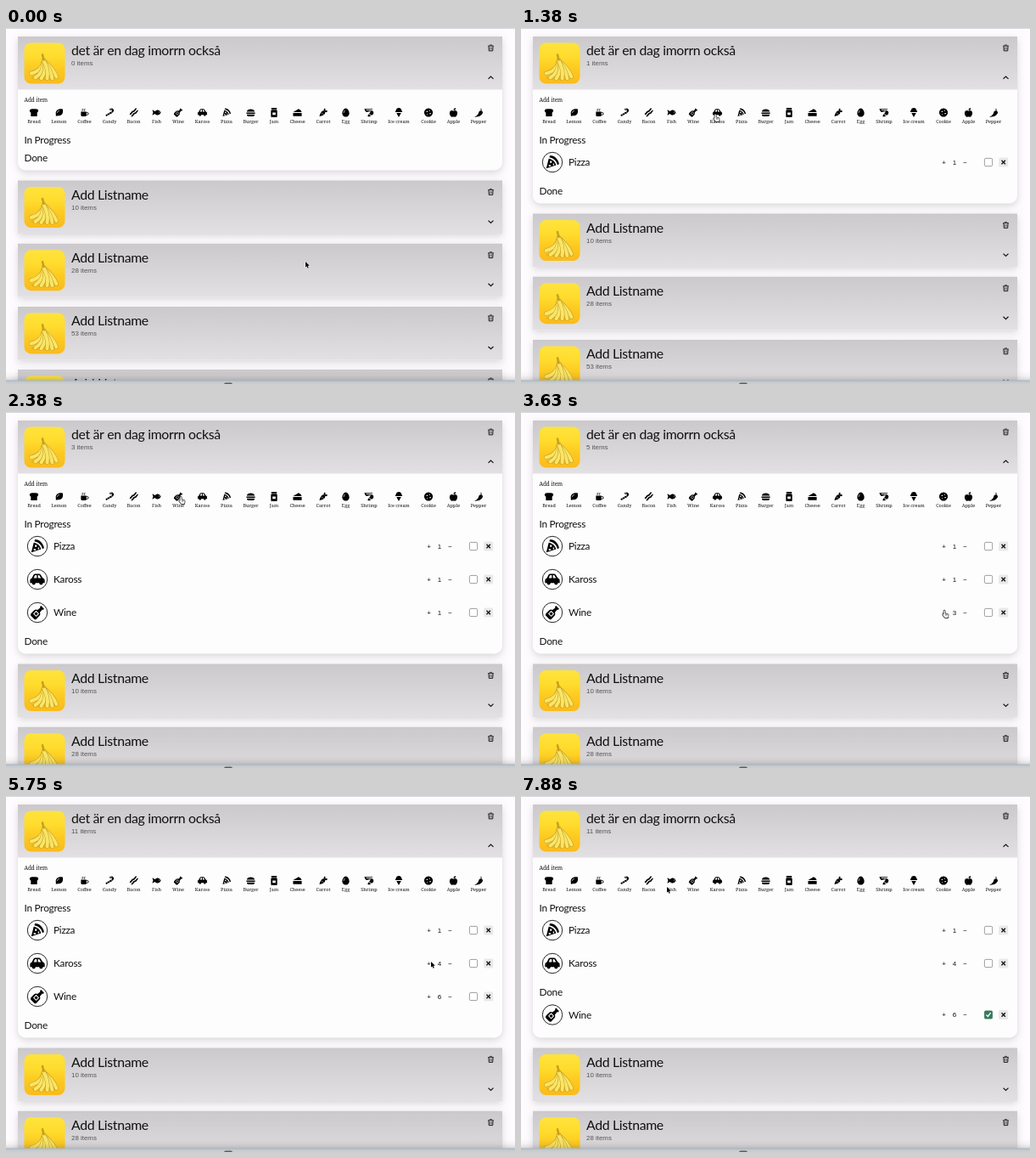
Recreate the animation shown at these times as an HTML page with a canvas. Size 600x419 px, loop 8000 ms.

```html
<!DOCTYPE html>
<html lang="sv">
<head>
<meta charset="utf-8">
<title>Shopping lists</title>
<style>
html, body { margin: 0; width: 100%; height: 100%; overflow: hidden; background: #fefcfe; }
canvas { display: block; width: 600px; height: 419px; }
</style>
</head>
<body>
<canvas id="stage"></canvas>
<script>
const W = 600, H = 419, LOOP = 8000, STEP = 125, ROW = 39;
const stage = document.getElementById('stage');
const dpr = window.devicePixelRatio || 1;
stage.width = Math.round(W * dpr);
stage.height = Math.round(H * dpr);
const c = stage.getContext('2d');

const DISPLAY = 'Lato, sans-serif';
const SANS = '"Liberation Sans", Arial, sans-serif';
const SERIF = '"Noto Serif", serif';

// Icons live on a 24-unit grid: fill, black line, white line.
const icons = {
  Bread: { x: 33, fill: 'M7 3h10c7 0 8 7 3 9v8q0 2-2 2H6q-2 0-2-2v-8C-1 10 0 3 7 3z' },
  Lemon: { x: 62.5, fill: 'M21 3c3 9-1 19-12 17l-5 1 0-5C2 7 10 1 21 3z', cut: 'M7 13q1-5 6-6' },
  Coffee: { x: 92.5, fill: 'M3 10h14v9a3 3 0 0 1-3 3H6a3 3 0 0 1-3-3z', line: 'M17 12h2a2 2 0 0 1 0 6h-2M7 8q-2-2 0-3t0-3M12 8q-2-2 0-3t0-3' },
  Candy: { x: 122, line: 'M3 20L18 11c6-4 1-10-5-6', lw: 4.6, cut: 'M5 15l4 5M10 12l4 5M16 9l4 5M16 2l0 5' },
  Bacon: { x: 150.5, line: 'M2 16c6 0 3-6 9-7s3-6 8-7M6 21c6 0 3-6 9-7s3-6 8-7', lw: 3.6 },
  Fish: { x: 177.5, fill: 'M1 5l7 4c5-6 12-4 15 3-3 7-10 9-15 3l-7 4 2-7zM18 10v2h2v-2z' },
  Wine: { x: 203, fill: 'M18 1l5 5-2 2-1-1-4 5c2 4-1 6-6 11q-2 1-4-1l-5-5q-1-2 1-4c5-5 7-7 10-5l5-4-1-1z', cut: 'M6 14l4 4 4-4-4-4z' },
  Kaross: { x: 231.5, fill: 'M1 11l2-1 3-6q1-1 2-1h7q1 0 2 1l4 6q3 1 3 3v5h-3a3 3 0 0 1-6 0H9a3 3 0 0 1-6 0H0v-5zM6 10h5V5H8zM13 10h5l-3-5h-2z', line: 'M6 17v2M18 17v2' },
  Pizza: { x: 260, fill: 'M8 1c8 0 14 7 15 14l-3 1C19 10 14 5 7 4zM6 6c6 1 11 5 12 11L2 22zM8 10v3h3v-3zM6 16v3h3v-3zM13 14v3h2v-3z' },
  Burger: { x: 288.5, fill: 'M2 10c0-9 20-9 20 0zM1 12h22v3H1zM2 17h20q0 5-4 5H6q-4 0-4-5z' },
  Jam: { x: 316, fill: 'M5 0h14v4H5zM6 5h12q2 1 2 3v13q0 3-2 3H6q-2 0-2-3V8q0-2 2-3zM8 12v6h8v-6z' },
  Cheese: { x: 343.5, fill: 'M1 11L15 3q7 2 8 8zM1 13h22v8H1z' },
  Carrot: { x: 374, fill: 'M2 22c2-8 5-14 10-15 5 1 6 5 4 8q-3 4-14 7zM14 8c-2-3 0-6 2-7q3 2 1 6 5-1 6 2-3 4-7 1z', cut: 'M7 12l3 3M13 17l-2-2' },
  Egg: { x: 400.5, fill: 'M12 1c5 0 9 8 9 13 0 12-18 12-18 0 0-5 4-13 9-13z', cut: 'M7 13q0-5 3-7' },
  Shrimp: { x: 428, fill: 'M0 2h21v2H4l1 2h10c10 0 11 10 4 13l-7-4 3-4H6Q1 9 0 2zM11 16l6 4-5 3-4-2z', cut: 'M14 5v5M8 10h8' },
  'Ice cream': { x: 463, fill: 'M5 11c-3 0-3-4 0-4 0-9 14-9 14 0 3 0 3 4 0 4zM6 13h12l-6 11z' },
  Cookie: { x: 498, fill: 'M12 1a11 11 0 1 0 .1 0zM7 8v3h3V8zM14 6v2h2V6zM8 15v2h2v-2zM15 13v3h3v-3z' },
  Apple: { x: 527.5, fill: 'M12 8c4-3 10-1 10 5 0 5-4 12-8 10h-4c-4 2-8-5-8-10 0-6 6-8 10-5zM12 6q0-6 6-5 0 5-6 5z' },
  Pepper: { x: 557, fill: 'M14 8l6-1 3 4c-1 10-13 13-22 12 9-3 10-7 13-15z', line: 'M18 8q2-3 0-6' }
};
for (const icon of Object.values(icons))
  for (const k of ['fill', 'line', 'cut']) if (icon[k]) icon[k] = new Path2D(icon[k]);

// time, tip x, tip y, hand?
const moves = [
  [0, 353, 275, 0], [125, 273, 160, 0], [375, 266, 122, 0], [625, 259, 101, 1],
  [1000, 259, 101, 1], [1250, 227, 101, 1], [1500, 227, 101, 1], [1750, 204, 99, 1],
  [2500, 204, 99, 0], [3125, 497, 233, 1], [4500, 497, 233, 0], [4750, 501, 195, 1],
  [5750, 501, 195, 0], [6250, 549, 234, 1], [7125, 549, 234, 0], [7875, 172, 107, 0]
];
const added = { Pizza: 1375, Kaross: 1875, Wine: 2375 };
const clicks = {
  Pizza: [],
  Kaross: [5000, 5250, 5500],
  Wine: [3375, 3625, 3875, 4125, 4375]
};
const DONE_AT = 6750;

function text(s, x, y, size, family, color = '#111', align = 'left', gap = 0) {
  c.font = size + 'px ' + family;
  c.letterSpacing = gap + 'px';
  c.textAlign = align;
  c.fillStyle = color;
  c.fillText(s, x, y);
}

function heading(s, x, y, size) {
  text(s, x, y, size, DISPLAY, '#111', 'left', -size * .02);
}

function box(x, y, w, h, r, fill, stroke) {
  c.beginPath();
  c.roundRect(x, y, w, h, r);
  if (fill) { c.fillStyle = fill; c.fill(); }
  if (stroke) { c.strokeStyle = stroke; c.lineWidth = .8; c.stroke(); }
}

function line(points, color, width) {
  c.beginPath();
  points.forEach(([x, y]) => c.lineTo(x, y));
  c.strokeStyle = color;
  c.lineWidth = width;
  c.stroke();
}

function fade(y0, y1, ...colors) {
  const g = c.createLinearGradient(0, y0, 0, y1);
  colors.forEach((color, i) => g.addColorStop(i / (colors.length - 1), color));
  return g;
}

function at(x, y, scale, draw) {
  c.save();
  c.translate(x, y);
  c.scale(scale, scale);
  draw();
  c.restore();
}

function drawIcon(name, x, y, scale) {
  const { fill, line: ink, cut, lw = 2 } = icons[name];
  at(x, y, scale, () => {
    c.translate(-12, -12);
    c.fillStyle = c.strokeStyle = '#000';
    c.lineWidth = lw;
    if (fill) c.fill(fill, 'evenodd');
    if (ink) c.stroke(ink);
    c.strokeStyle = '#fff';
    c.lineWidth = 1.4;
    if (cut) c.stroke(cut);
  });
}

function drawBananas(x, y) {
  at(x, y, 1, () => {
    box(0, 0, 48, 48, 8, fade(0, 48, '#ffe33c', '#ffdc2e', '#fcc81f', '#fabb1c'));
    c.fillStyle = 'rgba(214,148,14,.4)';
    c.beginPath();
    c.ellipse(24, 41, 16, 2.5, 0, 0, 7);
    c.fill();
    c.lineCap = 'round';
    // Tip, then bend, of each fruit; all hang from one stem.
    const fruit = [[8, 36, 21, 33], [38, 40, 34, 30], [33, 42, 31, 31], [13, 41, 23, 35], [20, 42, 27, 33], [27, 42, 29, 32]];
    for (const [ex, ey, cx, cy] of fruit)
      for (const [color, width] of [['#c2981f', 4.9], ['#f9e567', 4]]) {
        c.beginPath();
        c.moveTo(23, 21);
        c.quadraticCurveTo(cx, cy, ex, ey);
        c.strokeStyle = color;
        c.lineWidth = width;
        c.stroke();
      }
    line([[21.5, 14], [23, 20]], '#c5a11f', 2.6);
  });
}

function drawTrash(x, y) {
  at(x, y, .85, () => {
    line([[-4, -2.8], [4, -2.8]], '#111', 1);
    line([[-1.5, -3], [-1.2, -4.3], [1.2, -4.3], [1.5, -3]], '#111', .8);
    line([[-3, -2.5], [-2.6, 4], [2.6, 4], [3, -2.5]], '#111', 1.1);
    for (const d of [-1, 1]) line([[d, -1], [d, 2.5]], '#111', .7);
  });
}

function drawCard(y, title, count, bottom) {
  const open = bottom !== undefined;
  c.save();
  c.shadowColor = 'rgba(0,0,0,.15)';
  c.shadowBlur = 8 * dpr;
  c.shadowOffsetY = 3 * dpr;
  box(14, y, 571, (open ? bottom : y + 62.5) - y, open ? [0, 0, 9, 9] : [0, 0, 2, 2], '#fefdfe');
  c.restore();
  box(14, y, 571, 62.5, 0, fade(y, y + 62.5, '#cbc9cb', '#e2e0e2'));
  drawBananas(21.5, y + 7.5);
  heading(title, 77, y + 22, 15.8);
  text(count + ' items', 77, y + 34, 7.9, SANS, '#555');
  drawTrash(571.5, y + 13.5);
  const d = open ? -1.4 : 1.4;
  line([[568.5, y + 48.5 - d], [571.5, y + 48.5 + d], [574.5, y + 48.5 - d]], '#111', 1.2);
}

function drawRow(name, qty, y, checked) {
  c.beginPath();
  c.arc(37, y, 11.7, 0, 7);
  c.strokeStyle = '#111';
  c.lineWidth = .9;
  c.stroke();
  drawIcon(name, 37, y, .72);
  heading(name, 56, y + 4, 11.8);
  text('+', 498.5, y + 2.6, 8, SANS, '#111', 'center');
  text(qty, 511, y + 2.9, 8, SANS, '#111', 'center');
  text('−', 523.5, y + 2.6, 8, SANS, '#111', 'center');
  box(546.4, y - 4.6, 9.2, 9.2, 1.4, checked ? '#38795d' : '#fff', checked ? '#38795d' : '#888');
  if (checked) line([[548.5, y], [550.4, y + 2], [553.6, y - 2.3]], '#fff', 1.3);
  box(563.2, y - 5.5, 11, 11, 1.5, '#e9e8ea');
  for (const d of [-2.2, 2.2]) line([[568.7 - d, y - 2.2], [568.7 + d, y + 2.2]], '#111', 1.3);
}

const arrow = new Path2D('M0 0V10.5L2.4 8.3 4 12 5.9 11.2 4.3 7.6H7.6z');
const hand = new Path2D('M2 1.5q1-2 2 0V6l4 .8q2 .5 1.6 2.5L9 13H4L.5 9q-1-2 .8-1.6L2 8z');

function drawCursor(t) {
  let i = moves.length - 1;
  while (moves[i][0] > t) i--;
  const [t0, x0, y0, pointing] = moves[i];
  const [t1, x1, y1] = moves[i + 1] || [t0 + 1, x0, y0];
  const u = (t - t0) / (t1 - t0), e = u * u * (3 - 2 * u);
  at(x0 + (x1 - x0) * e, y0 + (y1 - y0) * e, pointing ? .7 : .64, () => {
    c.lineJoin = 'round';
    c.lineWidth = pointing ? 1.8 : 1.6;
    c.strokeStyle = pointing ? '#000' : '#fff';
    c.fillStyle = pointing ? '#fff' : '#000';
    const shape = pointing ? hand : arrow;
    c.stroke(shape);
    c.fill(shape);
    if (pointing) for (const x of [5.2, 7]) line([[x, 7], [x, 9.5]], '#000', .7);
  });
}

function drawDock() {
  box(0, 404, W, 11, 0, fade(404, 415, 'rgba(60,60,70,0)', 'rgba(60,60,70,.05)', 'rgba(60,60,70,.2)'));
  box(0, 414.5, W, 5, 0, fade(414, H, '#a9adb1', '#c0c8cd', '#c6d2d9'));
  box(257, 417.5, 10, 4, 2, '#6b5a4a');
}

function draw(t) {
  c.setTransform(dpr, 0, 0, dpr, 0, 0);
  c.fillStyle = '#fefcfe';
  c.fillRect(0, 0, W, H);
  c.fillStyle = '#cfced1';
  c.fillRect(0, 0, W, .8);

  const items = Object.keys(added).filter(n => t >= added[n]).map(name => ({
    name,
    qty: 1 + clicks[name].filter(k => t >= k).length,
    done: name === 'Wine' && t >= DONE_AT
  }));
  const todo = items.filter(i => !i.done), done = items.filter(i => i.done);
  const total = items.reduce((sum, i) => sum + i.qty, 0);
  const bottom = 167.5 + ROW * items.length;

  [10, 28, 53, 12].forEach((n, i) => {
    const y = bottom + 12 + 74.2 * i;
    if (y < H) drawCard(y, 'Add Listname', n);
  });
  drawCard(10, 'det är en dag imorrn också', total, bottom);

  text('Add item', 21.5, 86.5, 6.4, SERIF);
  for (const name in icons) {
    drawIcon(name, icons[name].x, 99.5, .46);
    text(name, icons[name].x, 112, 5.5, SERIF, '#111', 'center');
  }
  heading('In Progress', 21.5, 135.5, 11.8);
  todo.forEach((it, i) => drawRow(it.name, it.qty, 158 + ROW * i, false));
  const doneY = 153 + ROW * todo.length;
  heading('Done', 21.5, doneY + 4, 11.8);
  done.forEach((it, i) => drawRow(it.name, it.qty, doneY + 26.5 + ROW * i, true));

  drawDock();
  drawCursor(t);
}

const start = performance.now();
function tick() {
  const t = (performance.now() - start) % LOOP;
  draw(Math.floor(t / STEP) * STEP);
  requestAnimationFrame(tick);
}
tick();
</script>
</body>
</html>
```
